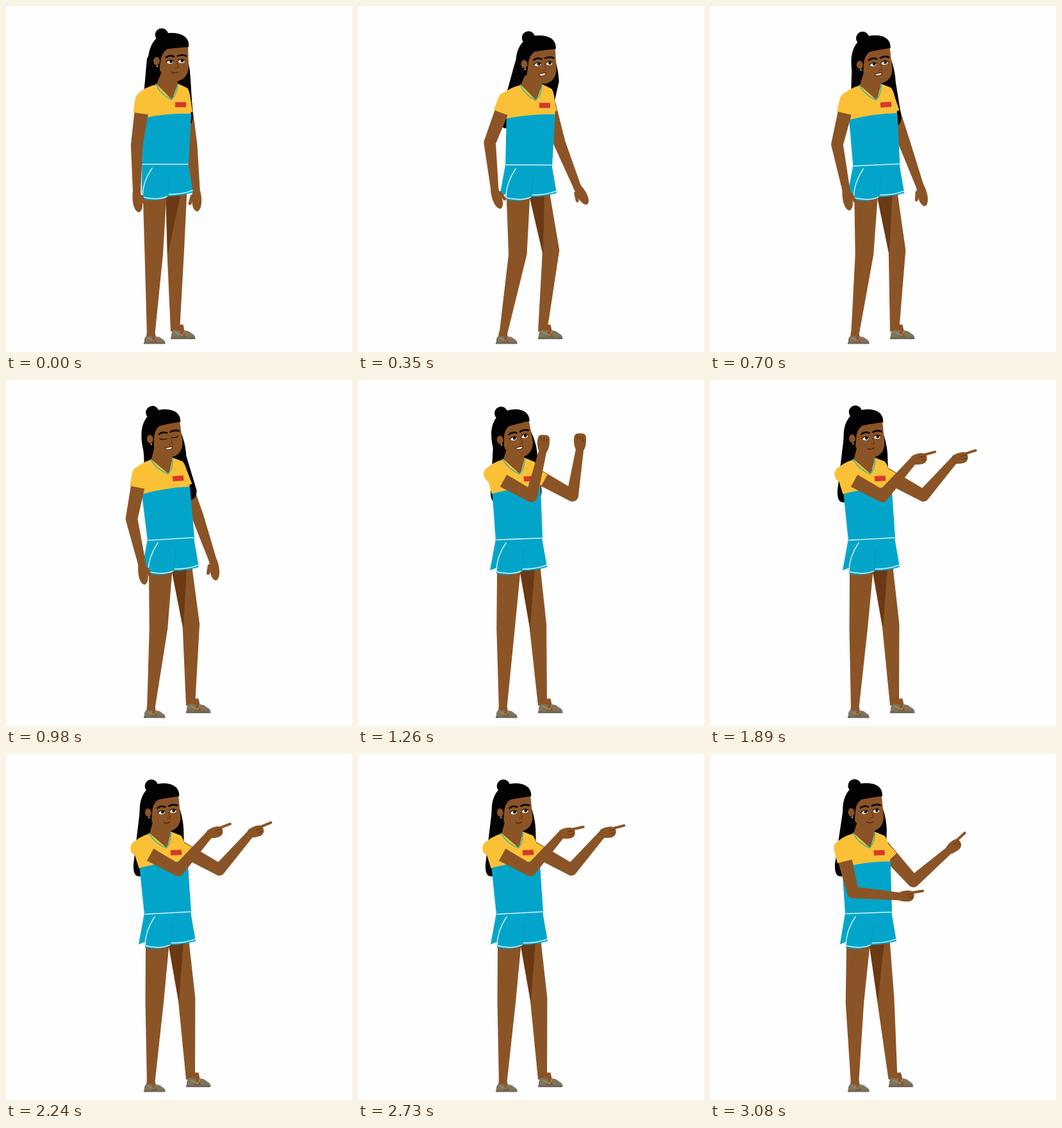
Write an HTML page that moves like this. It is 540 px wide and 540 px high and loops after 3150 ms.

```html
<!DOCTYPE html>
<html lang="en">
<head>
<meta charset="utf-8">
<title>Character loop</title>
<style>
  html, body { margin: 0; width: 100%; height: 100%; overflow: hidden; background: #fefefe; }
  svg { display: block; width: 100%; height: 100%; }
  .skin { fill: #8b5426; }
  .teal { fill: #02a5c9; }
  .yellow { fill: #fac137; }
  .hair { fill: #020202; }
  .sandal { fill: #81745c; }
  .line { fill: none; stroke-linecap: round; stroke-linejoin: round; }
  .hem { stroke: #d3f1f6; stroke-width: 1.5; }
  .crease { stroke: #0491b3; stroke-width: 1; }
  .mark { stroke: #613510; stroke-width: 1.1; }
  .brow { stroke: #080504; stroke-width: 2.7; }
  .lid { stroke: #140b06; stroke-width: 1.3; }
</style>
</head>
<body>
<svg viewBox="0 0 540 540">
  <defs>
    <g id="foot">
      <path class="skin" d="M220 508H232L234 517L246 521V526H218Z"/>
      <path class="sandal" d="M219 515L229 516L227 525H216Q215 518 219 515ZM232 515L240 517L248 523V526H236Z"/>
      <path class="line" stroke="#a39a86" d="M221 518L230 522M234 517L230 524"/>
      <path fill="#6f6757" d="M215 524.5H248Q250 527.5 247 527.5H215Z"/>
    </g>
    <g id="open" class="skin">
      <path d="M-3-6Q10-9 20-7Q29-5 30 0Q28 6 17 7L-3 6Z"/>
      <path d="M2 2L18 8Q22 12 17 13L4 9Z"/>
    </g>
    <g id="fist">
      <path class="skin" d="M-3-6Q3-10 14-10Q23-10 23-3V4Q22 9 15 9Q4 10-3 6Z"/>
      <path class="line mark" d="M14-5H20M14 0H20M11 4H18"/>
    </g>
    <g id="point">
      <path class="line" stroke="#8b5426" stroke-width="4" d="M12-4L35-5"/>
      <path class="skin" d="M-3-6Q4-9 13-8Q21-7 21 0Q20 8 13 9Q4 9-3 6Z"/>
      <path class="line mark" d="M10-2H19M12 3H19"/>
    </g>
  </defs>

  <g id="farArm"></g>
  <path id="backHair" class="hair"/>
  <path id="farSleeve" class="yellow"/>

  <path id="farLeg" class="skin"/>
  <path id="legShade" fill="#6b3913"/>
  <g id="farFoot"><use href="#foot" transform="translate(12 -95) scale(1.14 1.166)"/></g>
  <path id="nearLeg" class="skin"/>
  <use href="#foot"/>

  <g id="shorts">
    <path id="flap" class="teal"/>
    <path class="teal" d="M212 245H284L292 291Q272 297 253 297Q236 307 213 301Z"/>
    <path class="line hem" d="M228 253Q213 275 213 298Q238 304 252 297M254 294Q276 294 291 288"/>
    <path class="line crease" d="M255 264Q255 282 252 297"/>
  </g>

  <g id="torso">
    <path class="yellow" d="M236 122Q215 127 205 138L212 175H288L289 160Q288 134 283 128L268 121L259 146Z"/>
    <path class="teal" d="M213 175Q250 167 289 168L285 249H212Z"/>
    <path class="line hem" d="M213 247H284"/>
    <path class="skin" d="M235 122L244 100H266L268 122L259 146Z"/>
    <path class="line" stroke="#49b59a" stroke-width="1.7" d="M234 122Q241 138 258 146Q267 138 268 122"/>
    <rect x="264" y="150" width="17" height="8" fill="#d7382b"/>
  </g>

  <g id="head">
    <circle class="hair" cx="243" cy="45" r="10.3"/>
    <path class="skin" d="M238 66L284 62L285 95Q284 111 272 116Q263 120 253 114L240 101Z"/>
    <path class="hair" d="M223 104C217 62 234 42 258 42C276 42 287 50 285 64Q268 65 252 67Q242 73 241 88L238 104Z"/>
    <ellipse class="skin" cx="235" cy="86" rx="5" ry="6.5"/>
    <circle cx="236" cy="94" r="1.2" fill="#e8c565"/>
    <path class="line brow" d="M250 80Q255 76 262 79M268 78Q275 75 281 78"/>
    <g id="eyesOpen">
      <ellipse cx="256" cy="87" rx="5" ry="3.2" fill="#f7f3ee"/>
      <ellipse cx="274" cy="86" rx="4.8" ry="3.2" fill="#f7f3ee"/>
      <circle cx="257.5" cy="86.8" r="2.4" fill="#120b08"/>
      <circle cx="275" cy="85.8" r="2.4" fill="#120b08"/>
      <path class="line lid" d="M250 87Q256 82 261 86M269 85Q274 81 279 85"/>
    </g>
    <path id="eyesShut" class="line lid" d="M250 87Q256 90 261 88M269 87Q274 89 279 86"/>
    <path class="line mark" d="M267 87L269 96L264 97"/>
    <path id="mouthShut" class="line" stroke="#4c250f" stroke-width="1.3" d="M258 103Q263 106 268 103"/>
    <path id="mouthOpen" d="M257 102L269 101Q267 107 259 105Z" fill="#f4ece4" stroke="#5a2b15" stroke-width="1.2"/>
  </g>

  <g id="nearArm"></g>
  <path id="nearSleeve" class="yellow"/>
</svg>
<script>
const LOOP = 3150, TICK = 70;
const $ = id => document.getElementById(id);
const set = (id, d) => $(id).setAttribute('d', d);
const move = (id, value) => $(id).setAttribute('transform', value);
const show = (id, on) => { $(id).style.display = on ? '' : 'none'; };

// Sideways shifts in px; arms hold the angles of upper arm, forearm and hand.
const POSES = {
  stand: { step: 0, hip: 0, chest: 0, tail: 0, turn: 0, near: [98, 90, 83], far: [81, 84, 88] },
  lean: { step: 1, hip: 18, chest: 19, tail: 10, turn: -2, near: [111, 84, 72], far: [74, 68, 60] },
  sway: { step: 1, hip: 9, chest: -5, tail: 6, turn: -6, near: [101, 77, 83], far: [69, 71, 82] },
  swing: { step: 1, hip: 6, chest: -5, tail: 2, turn: -7, near: [65, 10, 10], far: [42, -2, -2] },
  fists: { step: 1, hip: 3, chest: -6, tail: -5, turn: -9, near: [29, -76, -85], far: [29, -81, -88] },
  point: { step: 1, hip: 4, chest: -8, tail: -13, turn: -4, near: [29, -49, -13], far: [29, -49, -15] },
  show: { step: 0.9, hip: -1, chest: -9, tail: -17, turn: -4, near: [76, 5, -6], far: [48, -41, -40] }
};
const TIMELINE = [
  [70, 'stand'], [350, 'lean'], [420, 'lean'], [840, 'sway'], [980, 'sway'],
  [1120, 'swing'], [1260, 'fists'], [1400, 'point'], [2870, 'point'], [3080, 'show']
];

function mix(a, b, u) {
  if (typeof a === 'number') return a + (b - a) * u;
  if (Array.isArray(a)) return a.map((v, i) => mix(v, b[i], u));
  return Object.fromEntries(Object.keys(a).map(k => [k, mix(a[k], b[k], u)]));
}

function poseAt(t) {
  const next = Math.max(1, TIMELINE.findIndex(([time]) => time >= t));
  const [[t0, from], [t1, to]] = TIMELINE.slice(next - 1, next + 1);
  const u = Math.max(0, (t - t0) / (t1 - t0));
  return mix(POSES[from], POSES[to], u * u * (3 - 2 * u));
}

const along = ([x, y], angle, length) => [
  x + length * Math.cos(angle * Math.PI / 180),
  y + length * Math.sin(angle * Math.PI / 180)
];

// Tapered limb with a round start and a round or flat end.
function limb(a, angle, length, ra, rb, flat) {
  const b = along(a, angle, length);
  const side = (p, r) => along(p, angle + 90, r).join(' ');
  const end = flat ? 'L' : `A${rb} ${rb} 0 0 0 `;
  return `M${side(a, ra)}L${side(b, rb)}${end}${side(b, -rb)}` +
    `L${side(a, -ra)}A${ra} ${ra} 0 0 0 ${side(a, ra)}Z`;
}

function drawArm(name, shoulder, [upper, fore, turn], hand, flip, cuff) {
  const elbow = along(shoulder, upper, 71);
  const wrist = along(elbow, fore, 75);
  const mirror = hand === 'open' ? flip : 1;
  $(name + 'Arm').innerHTML =
    `<path class="skin" d="${limb(shoulder, upper, 71, 11.5, 9.3)}${limb(elbow, fore, 75, 9.3, 6)}"/>` +
    `<use href="#${hand}" transform="translate(${wrist}) rotate(${turn}) scale(1 ${mirror})"/>`;
  set(name + 'Sleeve', limb(shoulder, upper, 21, cuff, cuff, true));
}

function drawLegs({ hip, step }) {
  const foot = 24 * step;
  const nearKnee = 1.25 * hip - 4 * step;
  const farKnee = 1.35 * hip + 12 * step;
  move('farFoot', `translate(${foot} 0)`);
  set('nearLeg', `M${214 + hip} 285H${250 + hip}V303L${245 + nearKnee} 388L232 516H220L${216.5 + nearKnee} 388L${214 + hip} 303Z`);
  set('farLeg', `M${249 + hip} 285H${282 + hip}V297L${278 + farKnee} 381L${271 + foot} 508H${257 + foot}L${251.5 + farKnee} 385L${249.5 + hip} 298Z`);
  set('legShade', `M${249 + hip} 292H${273 + hip}L${252.5 + farKnee} 388Z`);
}

function drawTorso({ hip, chest, step }) {
  const lean = (hip - chest) / 102;
  const tilt = -0.45 * lean;
  move('torso', `matrix(1 ${tilt} ${lean} 1 ${chest - 146 * lean} ${step - 250 * tilt})`);
  move('shorts', `translate(${hip} ${step})`);
  set('flap', `M212 247L${212 - 9 * step} 296L214 292Z`);
}

function drawHead({ chest, step, turn, tail }) {
  const x = 1.35 * chest, y = 4 * step;
  move('head', `translate(${x} ${y}) rotate(${turn} 255 120)`);
  set('backHair', `M${235 + x} ${54 + y}L${220 + x} ${82 + y}L${212 + tail} 172` +
    `Q${211 + tail} 192 ${222 + tail} 191L${282 + tail} 187Q${292 + tail} 186 ${291.5 + tail} 172` +
    `L${288 + x} ${114 + y}Q${287 + x} ${86 + y} ${274 + x + turn} ${54 + y}Z`);
}

function draw(time) {
  const tick = Math.floor((time % LOOP) / TICK);
  const t = tick * TICK;
  const pose = poseAt(t);
  const hand = t < 1090 ? 'open' : t < 1330 ? 'fist' : 'point';
  if (t >= 1400 && t < 2940) {
    const bob = 5 * Math.cos((t - 1540) / 1400 * 2 * Math.PI);
    pose.near[2] += bob;
    pose.far[2] += bob;
  }

  drawHead(pose);
  drawTorso(pose);
  drawLegs(pose);
  drawArm('far', [278 + 0.9 * pose.chest, 146], pose.far, hand, 1, 10);
  drawArm('near', [214 + 0.9 * pose.chest, 147], pose.near, hand, -1, 12.5);

  const blink = t >= 910 && t <= 1050;
  const talking = t >= 280 && t < 1400 && tick % 4 !== 0;
  show('eyesOpen', !blink);
  show('eyesShut', blink);
  show('mouthOpen', talking);
  show('mouthShut', !talking);
}

const start = performance.now();
function loop() {
  draw(performance.now() - start);
  requestAnimationFrame(loop);
}
loop();
</script>
</body>
</html>
```
